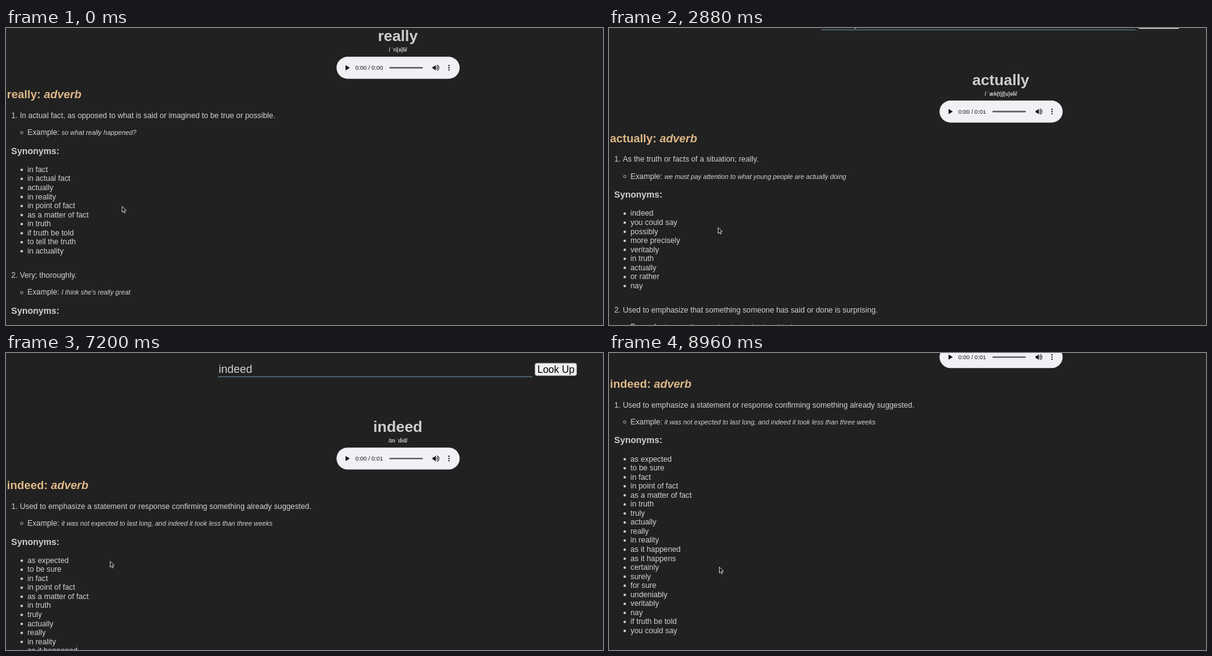
An HTML page with a canvas for the animation above (9520 ms loop, 960x478 px).

```html
<!DOCTYPE html>
<html lang="en">
<head>
<meta charset="utf-8">
<title>Dictionary</title>
<style>
html, body { margin: 0; width: 100%; height: 100%; overflow: hidden; background: #212121; }
canvas { display: block; width: 960px; height: 478px; }
</style>
</head>
<body>
<canvas id="stage" width="960" height="478"></canvas>
<script>
const ctx = document.getElementById('stage').getContext('2d');
const LOOP = 9520, STEP = 80, PITCH = 14.55;
const BG = '#212121', TEXT = '#d2d2d2', TAN = '#deb887';
const FAMILY = '"Liberation Sans", Arial, sans-serif';
const BODY = 12.3;

const pages = {
  really: {
    sound: '/ ˈri(ə)li/', start: 0,
    senses: [
      { def: 'In actual fact, as opposed to what is said or imagined to be true or possible.',
        example: 'so what really happened?',
        words: ['in fact', 'in actual fact', 'actually', 'in reality', 'in point of fact',
          'as a matter of fact', 'in truth', 'if truth be told', 'to tell the truth', 'in actuality'] },
      { def: 'Very; thoroughly.', example: "I think she's really great", words: [] }
    ]
  },
  actually: {
    sound: '/ ˈæk(t)ʃ(u)əli/', start: 1280,
    senses: [
      { def: 'As the truth or facts of a situation; really.',
        example: 'we must pay attention to what young people are actually doing',
        words: ['indeed', 'you could say', 'possibly', 'more precisely', 'veritably',
          'in truth', 'actually', 'or rather', 'nay'] },
      { def: 'Used to emphasize that something someone has said or done is surprising.',
        example: 'he actually wanted to do absolutely nothing!', words: [] }
    ]
  },
  indeed: {
    sound: '/ɪn ˈdid/', start: 5680,
    senses: [
      { def: 'Used to emphasize a statement or response confirming something already suggested.',
        example: 'it was not expected to last long, and indeed it took less than three weeks',
        words: ['as expected', 'to be sure', 'in fact', 'in point of fact', 'as a matter of fact',
          'in truth', 'truly', 'actually', 'really', 'in reality', 'as it happened', 'as it happens',
          'certainly', 'surely', 'for sure', 'undeniably', 'veritably', 'nay', 'if truth be told',
          'you could say'] }
    ]
  }
};

// Keys: time, baseline of the word heading
const scroll = [
  [0, 21], [1279, 21], [1280, 174], [1920, 174], [2160, 168], [2320, 143], [2480, 108],
  [2640, 90.8], [2800, 90.8], [2880, 91.5], [3680, 93.5], [5679, 93.5], [5680, 174],
  [6720, 174], [6880, 167], [7120, 140], [7600, 61], [7840, 33], [8080, 7], [8360, -23], [8640, -36.4]
];
// Keys: time, pointer x, pointer y
const pointer = [
  [0, 186.7, 287], [880, 57, 257], [1200, 57, 257], [1520, 174.5, 327], [2640, 174.5, 327],
  [2880, 175.5, 321], [3200, 175.5, 321], [3680, 88, 385], [4080, 59, 334.5], [4560, 59, 334.5],
  [4720, 60, 344], [4800, 60, 344], [5520, 54, 303], [5600, 54, 303], [6240, 157.5, 326],
  [6720, 157.5, 326], [7680, 177.5, 344.5]
];

function sample(keys, t, ease = k => k) {
  const i = keys.findIndex(k => k[0] > t);
  if (i < 0) return keys[keys.length - 1].slice(1);
  const a = keys[i - 1], b = keys[i];
  const k = ease((t - a[0]) / (b[0] - a[0]));
  return a.slice(1).map((v, n) => v + (b[n + 1] - v) * k);
}
const smooth = k => k * k * (3 - 2 * k);

function text(str, x, y, size, { style = '', color = TEXT, align = 'left' } = {}) {
  ctx.font = `${style} ${size}px ${FAMILY}`;
  ctx.fillStyle = color;
  ctx.textAlign = align;
  ctx.fillText(str, x, y);
  return ctx.measureText(str).width;
}

function dot(x, y, r, color = TEXT) {
  ctx.fillStyle = color;
  ctx.beginPath();
  ctx.arc(x, y, r, 0, 7);
  ctx.fill();
}

function box(x, y, w, h, r, color) {
  ctx.fillStyle = color;
  ctx.beginPath();
  ctx.roundRect(x, y, w, h, r);
  ctx.fill();
}

function poly(points) {
  ctx.beginPath();
  points.forEach(([x, y]) => ctx.lineTo(x, y));
  ctx.closePath();
}

function searchBar(word, top) {
  text('Look up any English Word!', 630, top - 144, 24.56, { style: 'bold', color: '#cecece', align: 'center' });
  text(word, 342, top - 94.6, 18);
  ctx.fillStyle = '#648094';
  ctx.fillRect(341, top - 89.2, 505.5, 1.2);
  box(850, top - 111, 68, 21, 4, '#777');
  box(851, top - 110, 66.5, 19.5, 3, '#efefef');
  text('Look Up', 884.3, top - 94.7, 16, { color: '#000', align: 'center' });
}

function player(y, length) {
  const ink = '#111';
  box(531.5, y - 17.7, 198, 35.4, 17.7, '#f0f1f5');
  ctx.fillStyle = ink;
  poly([[546, y - 4.2], [546, y + 4.2], [552.8, y]]);
  ctx.fill();
  text('0:00 / ' + length, 561.8, y + 3.4, 9.4, { color: ink });
  box(616.5, y - 1.2, 53.8, 2.4, 1.2, '#5b5b60');
  ctx.fillStyle = ink;
  poly([[686, y - 1.8], [688.2, y - 1.8], [691.2, y - 4.6], [691.2, y + 4.6], [688.2, y + 1.8], [686, y + 1.8]]);
  ctx.fill();
  ctx.strokeStyle = ink;
  ctx.lineWidth = 1.1;
  [2, 4.5].forEach(r => {
    ctx.beginPath();
    ctx.arc(691.7, y, r, -1.3, 1.3);
    ctx.stroke();
  });
  [-3.6, 0, 3.6].forEach(d => dot(712.3, y + d, 1.15, ink));
}

// Draws the senses and tells whether the pointer is over a synonym
function senses(list, y, px, py) {
  let hit = false;
  list.forEach((sense, n) => {
    text(`${n + 1}. ${sense.def}`, 8.5, y, BODY);
    y += 27.1;
    ctx.strokeStyle = TEXT;
    ctx.lineWidth = 0.8;
    ctx.beginPath();
    ctx.arc(25.3, y - 3.5, 2, 0, 7);
    ctx.stroke();
    const w = text('Example: ', 34.5, y, BODY);
    text(sense.example, 34.5 + w, y, 10.58, { style: 'italic' });
    y += 30.7;
    text('Synonyms:', 8.3, y, 14.4, { style: 'bold', color: '#cecece' });
    y += 29.2;
    sense.words.forEach(word => {
      ctx.font = `${BODY}px ${FAMILY}`;
      const over = py > y - 11 && py < y + PITCH - 11 && px > 34 && px < 35 + ctx.measureText(word).width;
      hit = hit || over;
      dot(25.3, y - 3.6, 2);
      text(word, 34.5, y, BODY, { color: over ? TAN : TEXT });
      y += PITCH;
    });
    y += 24.8;
  });
  return hit;
}

function cursor(x, y, hand) {
  ctx.save();
  ctx.translate(x, y);
  ctx.lineJoin = 'round';
  if (hand) {
    poly([[-0.9, 0], [0.5, 0], [0.9, 3.4], [2.3, 3.4], [3.9, 4], [4.9, 5], [4.6, 7.2], [3.7, 9.6],
      [-0.8, 9.6], [-2.4, 7.3], [-3.7, 5.3], [-2.7, 4.6], [-0.9, 6]]);
    ctx.fillStyle = '#fff';
    ctx.strokeStyle = '#111';
  } else {
    poly([[0, 0], [0, 9.5], [2.1, 7.5], [3.6, 10.8], [5.1, 10.1], [3.7, 6.9], [6.6, 6.7]]);
    ctx.fillStyle = '#111';
    ctx.strokeStyle = '#e8e8e8';
  }
  ctx.lineWidth = 0.9;
  ctx.fill();
  ctx.stroke();
  ctx.restore();
}

function draw(t) {
  const word = t < pages.actually.start ? 'really' : t < pages.indeed.start ? 'actually' : 'indeed';
  const page = pages[word];
  const [top] = sample(scroll, t);
  const [px, py] = sample(pointer, t, smooth);
  const loaded = word !== 'really' && t >= page.start + STEP;

  ctx.fillStyle = BG;
  ctx.fillRect(0, 0, 960, 478);
  searchBar(word, top);
  text(word, 630, top, 24.56, { style: 'bold', color: '#cecece', align: 'center' });
  text(page.sound, 630.3, top + 17, 8.23, { style: 'bold', align: 'center' });
  player(top + 43, loaded ? '0:01' : '0:00');
  const w = text(word + ': ', 1.6, top + 92.3, 18.42, { style: 'bold', color: TAN });
  text('adverb', 1.6 + w, top + 92.3, 18.42, { style: 'italic bold', color: TAN });
  const hand = senses(page.senses, top + 123.9, px, py);
  cursor(px, py, hand);
}

const begin = performance.now();
function tick() {
  const t = (performance.now() - begin) % LOOP;
  draw(Math.floor(t / STEP) * STEP);
  requestAnimationFrame(tick);
}
tick();
</script>
</body>
</html>
```
